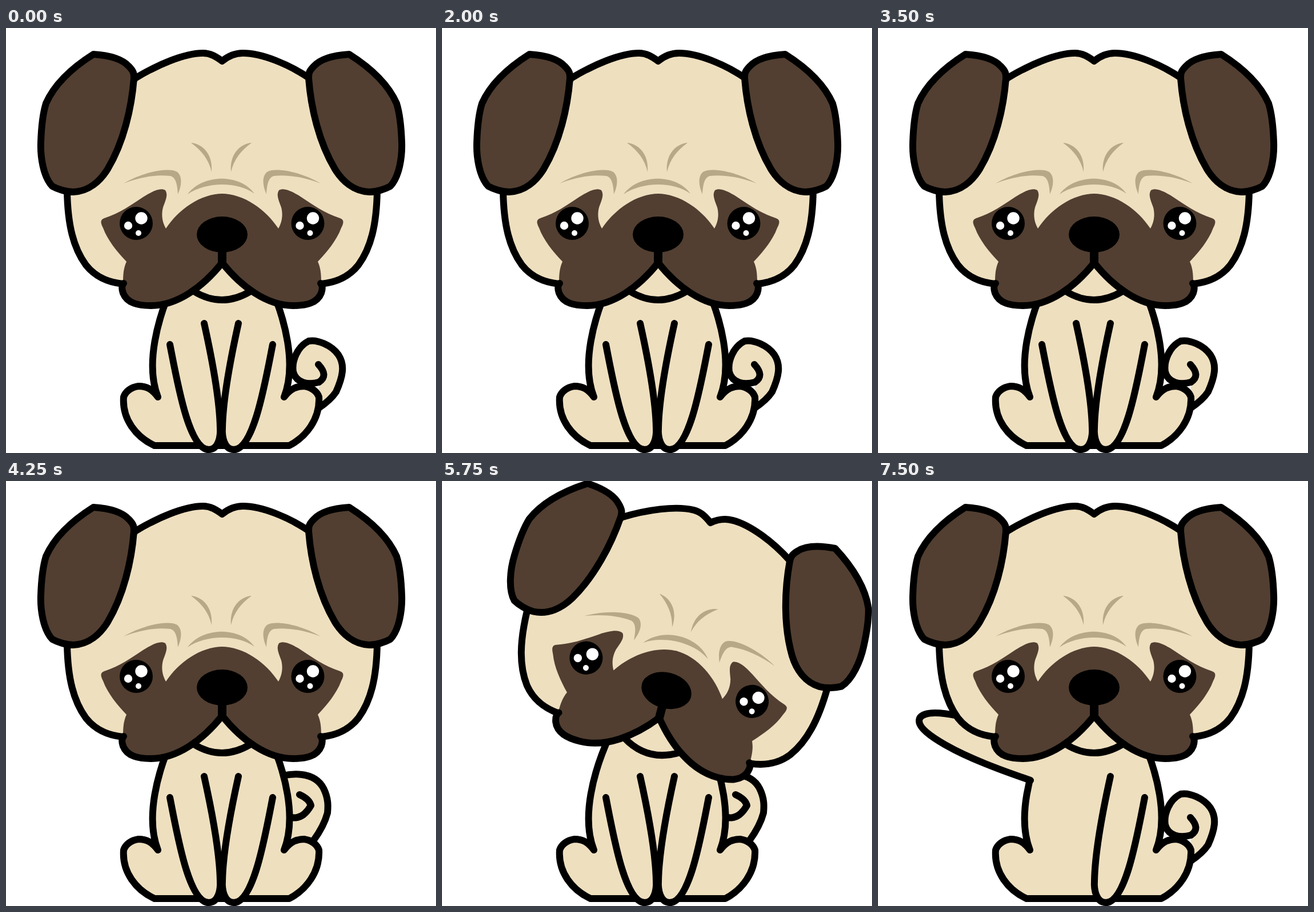
These frames come from a looping animation (753x744 px, 7750 ms). An HTML page without scripts:

```html
<!DOCTYPE html>
<html lang="en">
<head>
<meta charset="utf-8">
<title>Pug puppy</title>
<style>
  html, body { margin: 0; width: 100%; height: 100%; overflow: hidden; background: #fff; }
  svg { display: block; width: 100%; height: 100%; }
  .line { stroke: #000; stroke-width: 12; stroke-linecap: round; stroke-linejoin: round; }
  .fur { fill: #eedfbf; }
  .dark { fill: #523f31; }
  .fold { fill: #b7a888; }
  .open { fill: none; }
</style>
</head>
<body>
<svg viewBox="0 0 753 744">
  <defs>
    <path id="leg" class="fur line" d="M287 554C300 620 320 738 355 738C372 738 376 715 375 700C374 650 361 580 347 517"/>
    <g id="ear">
      <path class="dark line" d="M153 46C185 48 205 56 215 67C224 76 224 80 224 88C220 140 206 200 178 247C165 268 145 286 118 287C105 287 90 282 81 277C65 260 60 225 61 200C62 170 66 145 70 132C85 98 115 70 153 46Z"/>
      <path class="fold" d="M324 201C340 202 363 217 360 252C355 230 343 215 324 201Z"/>
    </g>
    <g id="cheek">
      <path class="dark" d="M380 290C340 290 302 318 280 351C275 342 271 330 275 314C280 300 284 292 279 284C270 279 256 286 240 296C220 309 200 324 172 333C164 336 166 342 170 350C178 372 195 392 211 409C206 420 205 430 205 447C202 458 203 464 205 464C212 482 232 486 254 486C300 486 345 453 380 411Z"/>
      <path class="line open" d="M206 447C202 451 203 458 205 464C212 482 232 486 254 486C300 486 345 453 378.5 411"/>
      <path class="fold" d="M206 272C240 252 285 243 300 252C309 260 308 275 301 291C300 275 298 262 288 259C265 256 235 261 206 272Z"/>
    </g>
    <!-- y is measured from the lower lid -->
    <g id="eye">
      <circle cx="228" cy="-29" r="29"/>
      <g fill="#fff">
        <circle cx="237" cy="-38" r="10.7"/>
        <circle cx="214" cy="-25" r="7.2"/>
        <circle cx="232" cy="-12" r="5"/>
      </g>
    </g>
  </defs>

  <g class="fur line">
    <path d="M547 589C559 602 560 612 548 620C530 625 508 622 503 602C500 583 510 558 530 548C545 545 570 555 582 572C594 590 590 610 578 637C572 646 560 657 548 665">
      <animate attributeName="visibility" calcMode="discrete" dur="7.75s" repeatCount="indefinite" values="visible;hidden;visible;hidden;visible;hidden;visible;hidden;visible;hidden;visible;hidden;visible;hidden;visible;hidden;visible;hidden;visible;hidden;visible;hidden;visible;hidden;visible;hidden;visible;hidden;visible;hidden;visible"/>
    </path>
    <path visibility="hidden" d="M470 520C500 510 540 508 556 538C565 556 564 570 563 581C558 600 549 615 538 630L500 640M514 549C525 554 532 560 534 568C526 582 515 592 500 589">
      <animate attributeName="visibility" calcMode="discrete" dur="7.75s" repeatCount="indefinite" values="hidden;visible;hidden;visible;hidden;visible;hidden;visible;hidden;visible;hidden;visible;hidden;visible;hidden;visible;hidden;visible;hidden;visible;hidden;visible;hidden;visible;hidden;visible;hidden;visible;hidden;visible;hidden"/>
    </path>
  </g>

  <path class="fur line" d="M294 445C264 510 244 590 266 646C256 632 246 627 232 627C218 629 209 637 206 646C203 685 228 716 260 731H496C525 716 550 685 548 646C545 637 536 629 522 627C508 627 498 632 487 646C509 590 490 510 460 445"/>

  <use href="#leg">
    <animate attributeName="visibility" calcMode="discrete" dur="7.75s" repeatCount="indefinite" keyTimes="0;.90322" values="visible;hidden"/>
  </use>
  <use href="#leg" transform="matrix(-1 0 0 1 754 0)"/>

  <g visibility="hidden">
    <animate attributeName="visibility" calcMode="discrete" dur="7.75s" repeatCount="indefinite" keyTimes="0;.90322" values="hidden;visible"/>
    <path class="fur" d="M267 524L140 411L290 465L310 510Z"/>
    <path class="fur line" d="M267 524C215 506 160 486 118 462C92 447 72 432 72 420C72 408 90 406 100 406C115 406 130 409 140 411L180 420"/>
  </g>

  <g>
    <animateTransform attributeName="transform" type="rotate" calcMode="discrete" dur="7.75s" repeatCount="indefinite"
      keyTimes="0;.32258;.41935;.48387;.54838;.70967;.80645"
      values="0;-14.24 376.5 421;0;-14.24 376.5 421;0;14.7 365.7 420.4;0"/>
    <path class="fur line" d="M205 448C185 446 160 440 140 415C118 385 108 345 107 285L226 88C264 65 312 44 345 44C358 44 368 50 378.5 58C388 50 400 44 415 44C448 44 494 63 530 87L650 285C649 345 639 385 617 415C597 440 572 446 552 448"/>
    <path class="fur" d="M378 400L325 458Q378 492 432 458Z"/>
    <path class="line open" d="M329 461Q378 491 428 461"/>
    <use href="#cheek"/>
    <use href="#cheek" transform="matrix(-1 0 0 1 757 0)"/>
    <use href="#ear"/>
    <use href="#ear" transform="matrix(-1 0 0 1 754 0)"/>
    <path class="fold" d="M318 291C345 255 410 255 435 290C405 268 350 269 318 291Z"/>
    <ellipse cx="378.5" cy="361.5" rx="44.5" ry="31.5"/>
    <path d="M371 385H386V411H371Z"/>
    <g transform="translate(0 371)">
      <g>
        <animateTransform attributeName="transform" type="scale" calcMode="discrete" dur="7.75s" repeatCount="indefinite" keyTimes="0;.16129;.19354" values="1 1;1 .63;1 1"/>
        <use href="#eye"/>
        <use href="#eye" x="300.5"/>
      </g>
    </g>
  </g>
</svg>
</body>
</html>
```
